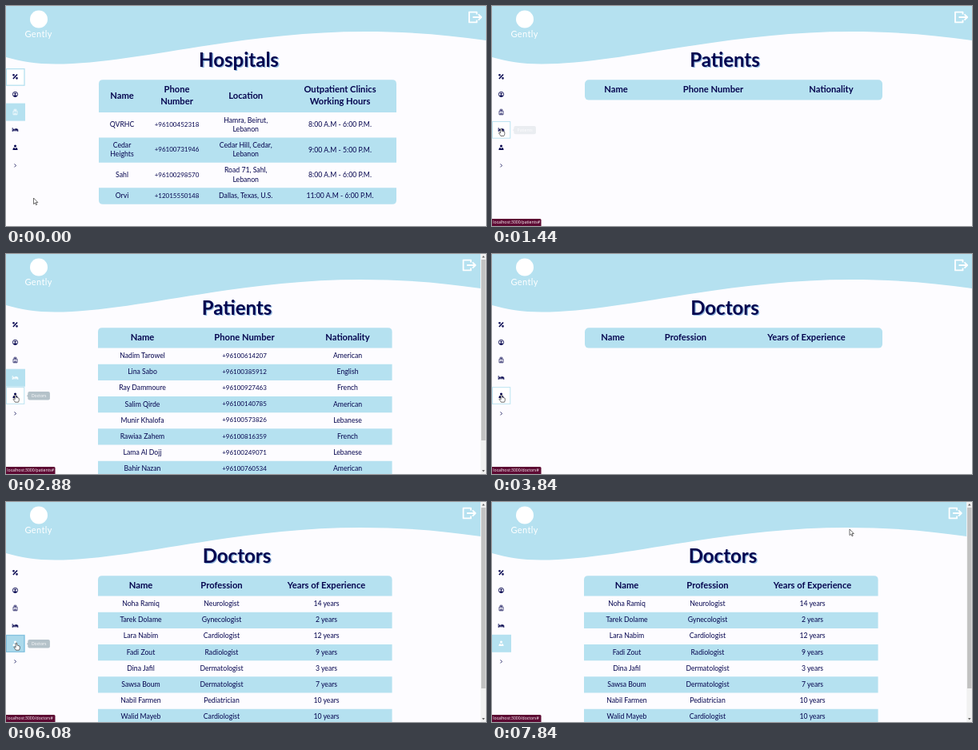
These frames come from a looping animation (600 px wide and 275 px high, 8 s). An HTML page:

```html
<!DOCTYPE html>
<html lang="en">
<head>
<meta charset="utf-8">
<title>Clinic dashboard</title>
<style>
  html, body { margin: 0; width: 100%; height: 100%; overflow: hidden; background: #fdfcff; }
  svg { display: block; width: 100vw; height: 100vh; font-family: Lato, "Open Sans", sans-serif; }
  .mid { text-anchor: middle; fill: #05054f; }
  .title { font-size: 24px; font-weight: 700; }
  .shade { fill: #8db4dc; }
  .head { font-size: 11.2px; font-weight: 700; }
  .cell { font-size: 8.7px; }
  .phone { font-size: 8px; }
  .tiny { font-family: "Open Sans", sans-serif; font-size: 5.1px; fill: #fff; }
</style>
</head>
<body>
<svg id="stage" viewBox="0 0 600 275"></svg>
<script>
const LOOP = 8000, STEP = 160;
const SKY = '#b5e1f0', INK = '#05054f', PAPER = '#fdfcff';
const SIZES = { title: 24, head: 11.2, cell: 8.7, phone: 8 };
const stage = document.getElementById('stage');

function add(parent, tag, attrs = {}, text) {
  const node = document.createElementNS('http://www.w3.org/2000/svg', tag);
  set(node, attrs);
  if (text) node.textContent = text;
  parent.appendChild(node);
  return node;
}
function set(node, attrs) { for (const key in attrs) node.setAttribute(key, attrs[key]); }
const show = (node, on) => { node.style.display = on ? '' : 'none'; };
const ramp = (t, a, b) => Math.min(1, Math.max(0, (t - a) / (b - a)));

// Text centred on x and y; a "|" starts a new line.
function label(parent, x, y, text, kind, gap = 0, extra = '') {
  const lines = text.split('|');
  lines.forEach((line, i) => add(parent, 'text', {
    class: `mid ${kind} ${extra}`, x,
    y: y + (i - (lines.length - 1) / 2) * gap + SIZES[kind] * 0.34
  }, line));
}

// Backdrop
add(stage, 'rect', { width: 600, height: 275, fill: PAPER });
const wave = add(stage, 'path', {
  fill: SKY,
  d: 'M0 0H600V43C550 36 505 32 448 32C290 32 160 72.5 62 72.5C38 72.5 18 69 0 64Z'
});
add(stage, 'circle', { cx: 41, cy: 16.5, r: 11, fill: '#fff' });
add(stage, 'text', {
  x: 40.7, y: 39, 'text-anchor': 'middle', 'font-size': 11, fill: '#fff', 'letter-spacing': 0.4
}, 'Gently');
const exit = add(stage, 'path', {
  d: 'M588.5 10.5V7.6H579V20.4H588.5V17.5M583.5 14H594M590.5 10.3L594.2 14L590.5 17.7',
  fill: 'none', stroke: '#fff', 'stroke-width': 1.8, 'stroke-linejoin': 'round'
});

// Pages
function page({ title, mid, left, right, cols, heads, rows = [], headH = 25.3, heights, phoneCol }) {
  const g = add(stage, 'g');
  label(g, mid + 1.3, 68.7, title, 'title', 0, 'shade');
  label(g, mid, 67.5, title, 'title');
  const top = 92.3, w = right - left, base = top + headH;
  if (rows.length) {
    add(g, 'path', { fill: SKY, d: `M${left} ${base}V${top + 5}q0 -5 5 -5H${right - 5}q5 0 5 5V${base}Z` });
  } else {
    add(g, 'rect', { x: left, y: top, width: w, height: headH, rx: 5, fill: SKY });
  }
  heads.forEach((h, i) => label(g, cols[i], top + headH / 2 - 0.6, h, 'head', 15));
  let y = base;
  rows.forEach((row, r) => {
    const h = heights ? heights[r] : 20.15;
    if (r % 2) {
      const last = heights && r === rows.length - 1;
      add(g, 'path', {
        fill: SKY,
        d: last ? `M${left} ${y}H${right}v${h - 5}q0 5 -5 5H${left + 5}q-5 0 -5 -5Z`
                : `M${left} ${y}H${right}v${h}H${left}Z`
      });
    }
    row.split(';').forEach((text, i) =>
      label(g, cols[i], y + h / 2 - 0.5, text, i === phoneCol ? 'phone' : 'cell', 11.3));
    y += h;
  });
  return g;
}

const wide = { mid: 291, left: 116, right: 488 };
const slim = { mid: 288.5, left: 115, right: 482.6 };
const patients = { title: 'Patients', heads: ['Name', 'Phone Number', 'Nationality'] };
const doctors = { title: 'Doctors', heads: ['Name', 'Profession', 'Years of Experience'] };

const pages = [
  page({
    ...wide, title: 'Hospitals', cols: [145, 213.5, 299.7, 417.5], headH: 40.7, phoneCol: 1,
    heads: ['Name', 'Phone|Number', 'Location', 'Outpatient Clinics|Working Hours'],
    heights: [31.4, 31.4, 31.4, 20.6],
    rows: [
      'QVRHC;+96100452318;Hamra, Beirut,|Lebanon;8:00 A.M - 6:00 P.M.',
      'Cedar|Heights;+96100731946;Cedar Hill, Cedar,|Lebanon;9:00 A.M - 5:00 P.M.',
      'Sahl;+96100298570;Road 71, Sahl,|Lebanon;8:00 A.M - 6:00 P.M.',
      'Orvi;+12015550148;Dallas, Texas, U.S.;11:00 A.M - 6:00 P.M.'
    ]
  }),
  page({ ...patients, ...wide, cols: [155, 276.5, 424] }),
  page({
    ...patients, ...slim, cols: [170.5, 298, 427], phoneCol: 1,
    rows: [
      'Nadim Tarowel;+96100614207;American',
      'Lina Sabo;+96100385912;English',
      'Ray Dammoure;+96100927463;French',
      'Salim Qirde;+96100140785;American',
      'Munir Khalofa;+96100573826;Lebanese',
      'Rawiaa Zahem;+96100816359;French',
      'Lama Al Dojj;+96100249071;Lebanese',
      'Bahir Nazan;+96100760534;American'
    ]
  }),
  page({ ...doctors, ...wide, cols: [151, 242, 393] }),
  page({
    ...doctors, ...slim, cols: [168.5, 269.5, 400.5],
    rows: [
      'Noha Ramiq;Neurologist;14 years',
      'Tarek Dolame;Gynecologist;2 years',
      'Lara Nabim;Cardiologist;12 years',
      'Fadi Zout;Radiologist;9 years',
      'Dina Jafil;Dermatologist;3 years',
      'Sawsa Boum;Dermatologist;7 years',
      'Nabil Farmen;Pediatrician;10 years',
      'Walid Mayeb;Cardiologist;10 years'
    ]
  })
];

// Scrollbar
const bar = add(stage, 'g');
add(bar, 'rect', { x: 593.4, width: 6.6, height: 275, fill: '#f1f1f1' });
add(bar, 'rect', { x: 594.1, y: 7, width: 5.4, height: 226, fill: '#c1c1c1' });
add(bar, 'path', { d: 'M595 4.5L596.8 2L598.6 4.5ZM595 270L596.8 272.5L598.6 270Z', fill: '#666' });

// Sidebar
const itemY = i => 88.3 + i * 22.1;
const tile = add(stage, 'rect', { width: 24, height: 22, fill: SKY });
const focus = add(stage, 'rect', {
  x: 0.4, y: 78.6, width: 22.6, height: 20.6, fill: '#fff', stroke: SKY, 'stroke-width': 1.3
});
const ring = add(stage, 'rect', { x: 0.4, width: 22.4, height: 20.6, 'stroke-width': 0.9 });
const line = (d, w) => ({ d, fill: 'none', 'stroke-width': w, stroke: 'currentColor' });
const solid = d => ({ d, fill: 'currentColor' });
const icons = [
  [line('M-2.6 2.8L2.6 -2.8', 1.5), line('M-2.8 -2a.8 .8 0 1 0 1.6 0a.8 .8 0 1 0 -1.6 0M1.2 2a.8 .8 0 1 0 1.6 0a.8 .8 0 1 0 -1.6 0', 1.1)],
  [line('M-3.1 0a3.1 3.1 0 1 0 6.2 0a3.1 3.1 0 1 0 -6.2 0', 0.9), solid('M-1.2 -.8a1.2 1.2 0 1 0 2.4 0a1.2 1.2 0 1 0 -2.4 0M-2.5 2.1Q0 -.3 2.5 2.1Q0 4.2 -2.5 2.1')],
  [line('M-2.5 3.3V-1.2H-1.3V-3.3H1.3V-1.2H2.5V3.3ZM0 -2.4V-.3M-1 -1.3H1M-.7 3.3V1.3H.7V3.3', 0.7)],
  [line('M-3.3 -2.4V2.4M-3.3 1.2H3.3M3.3 2.4V-.2', 0.9), solid('M-2.5 -.3a.9 .9 0 1 1 1.8 0V.6H-2.5ZM-.3 -1.4H2Q3.5 -1.4 3.5 .6H-.3Z')],
  [solid('M-1.5 -1.7a1.5 1.5 0 1 0 3 0a1.5 1.5 0 1 0 -3 0M-3.1 3.2Q-3.1 .6 -1.3 .4L0 1.9L1.3 .4Q3.1 .6 3.1 3.2Z')],
  [line('M-1 -2L1 0L-1 2', 0.8)]
].map((parts, i) => {
  const g = add(stage, 'g', { transform: `translate(11.5 ${itemY(i) + (i === 5 ? 0.6 : 0)})` });
  parts.forEach(p => add(g, 'path', p));
  return g;
});

const tip = add(stage, 'g');
add(tip, 'path', { d: 'M25.8 0L28 -1.8V1.8Z', fill: '#b4c2c9' });
add(tip, 'rect', { x: 27.3, y: -5.2, width: 27.6, height: 10.4, rx: 2, fill: '#b4c2c9' });
const tipText = add(tip, 'text', { class: 'tiny', x: 41.2, y: 1.9, 'text-anchor': 'middle' });

// Status bubble
const status = add(stage, 'g');
add(status, 'path', { d: 'M0 266H60q1.5 0 1.5 1.5V275H0Z', fill: '#5d0a33' });
const statusText = add(status, 'text', { class: 'tiny', x: 1.3, y: 272.3 });

// Pointers, tip at the origin
const outline = { fill: '#fff', stroke: '#222', 'stroke-width': 0.65, 'stroke-linejoin': 'round' };
const arrow = add(stage, 'path', { ...outline, d: 'M0 0V7.6L1.8 6L3 8.7L4.2 8.2L3 5.5H5.3Z' });
const hand = add(stage, 'path', {
  ...outline,
  d: 'M-.9 .6Q0 -.6 .8 .6V3.2Q1.7 2.8 2 3.6Q2.9 3.2 3.2 4Q4.3 3.8 4.3 5V6.6Q4.2 8 3.4 9.2H-.6Q-1.6 7.6 -2.9 5.6Q-2.9 4.5 -1.7 5L-.9 5.8Z'
});

const track = [
  [0, 34.5, 240], [160, 34, 238], [640, 24, 196], [1120, 11.5, 153], [2400, 11.5, 154],
  [2720, 12, 176], [3840, 12, 176], [4320, 13, 176], [6080, 13, 176],
  [6560, 42, 146], [7040, 87, 106], [7840, 447, 34], [8000, 447, 34]
];
function pointer(t) {
  const i = track.findIndex(k => k[0] > t);
  const [t0, x0, y0] = track[i - 1], [t1, x1, y1] = track[i];
  const p = (t - t0) / (t1 - t0);
  return [x0 + (x1 - x0) * p, y0 + (y1 - y0) * p];
}

function draw(t) {
  const current = [1280, 2080, 3520, 4320].filter(start => t >= start).length;
  const full = current === 2 || current === 4;
  pages.forEach((p, i) => show(p, i === current));
  show(bar, full);
  set(wave, { transform: `scale(${full ? 0.989 : 1} 1)` });
  set(exit, { transform: `translate(${full ? -7.4 : 0} 0)` });

  const [x, y] = pointer(t);
  const over = x < 24 && y > 78 ? Math.floor((y - 76.5) / 22.1) : -1;
  const hover = over < 6 ? over : -1;
  const active = [2, -1, 3, -1, 4][current];
  show(tile, active >= 0);
  set(tile, { y: itemY(active) - 10.9 });
  show(focus, t < 1280);
  show(ring, hover >= 0);
  const same = hover === active;
  const pressed = same && active === 4 && t < 4720;
  set(ring, {
    y: itemY(hover) - 10,
    fill: pressed ? '#a0cde0' : same ? '#abd9eb' : '#fff',
    stroke: same ? '#79b9dc' : SKY
  });
  icons.forEach((g, i) => { g.style.color = i === active ? '#fff' : INK; });

  let fade = 0;
  if (hover === 3) fade = ramp(t, 1360, 1680);
  if (hover === 4) fade = t < 3520 ? ramp(t, 2560, 2880) : ramp(t, 4160, 4480);
  show(tip, fade > 0);
  set(tip, { opacity: fade, transform: `translate(0 ${itemY(hover) + 0.5})` });
  tipText.textContent = hover === 3 ? 'Patients' : 'Doctors';

  show(status, t >= 1280);
  statusText.textContent = `localhost:3000/${current < 3 ? 'patients' : 'doctors'}#`;
  show(hand, hover >= 0);
  show(arrow, hover < 0);
  set(hover >= 0 ? hand : arrow, { transform: `translate(${x} ${y})` });
}

const begin = performance.now();
function tick() {
  const t = (performance.now() - begin) % LOOP;
  draw(Math.floor(t / STEP) * STEP);
  requestAnimationFrame(tick);
}
tick();
</script>
</body>
</html>
```
